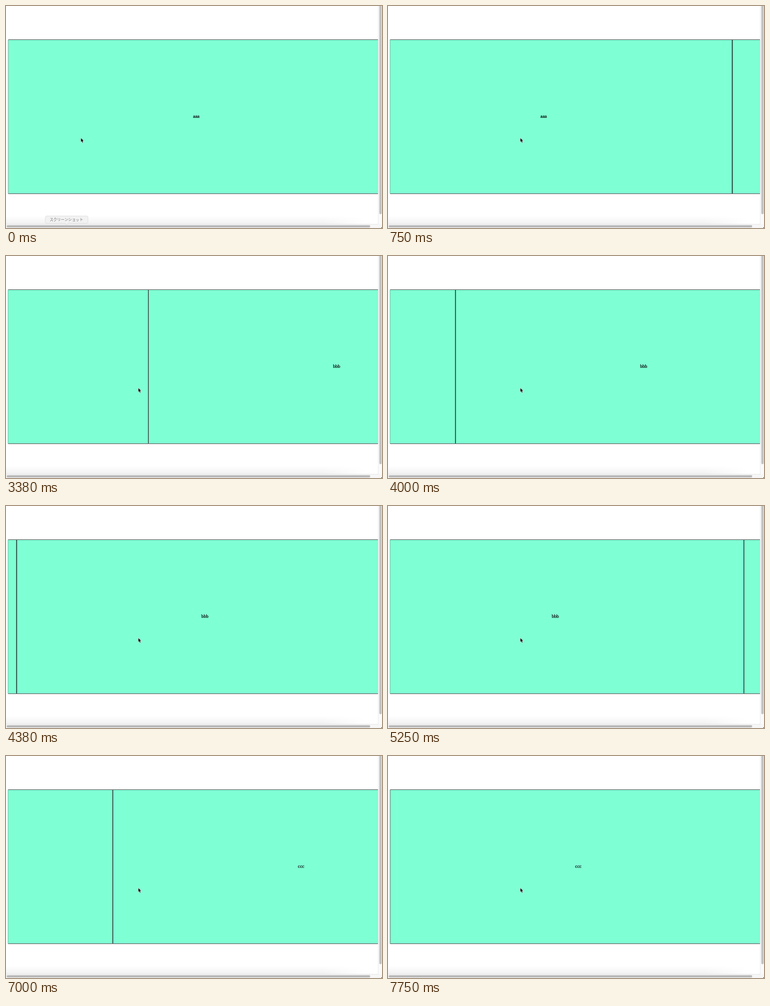
Recreate the animation shown at these times as an HTML page. Size 640 by 379 pixels, loop 8000 ms.

```html
<!DOCTYPE html>
<html lang="ja">
<head>
<meta charset="utf-8">
<title>Horizontal slides</title>
<style>
  html, body { margin: 0; width: 100%; height: 100%; overflow: hidden; background: #fff; }
  svg { display: block; width: 100vw; height: 100vh; }
  .slide text {
    font: 8px "Liberation Serif", "Times New Roman", serif;
    text-anchor: middle; stroke: #000; stroke-width: .2px;
  }
  #tip text {
    font: 500 6.4px "Noto Sans CJK JP", "Noto Sans CJK", sans-serif;
    text-anchor: middle; fill: #707070;
  }
</style>
</head>
<body>
<svg viewBox="0 0 640 379">
  <defs>
    <clipPath id="view"><rect x="3.5" y="50" width="630" height="280"/></clipPath>
    <linearGradient id="shade" x2="0" y2="1">
      <stop offset="0" stop-opacity="0"/>
      <stop offset="1" stop-opacity=".055"/>
    </linearGradient>
    <linearGradient id="fade">
      <stop offset=".84" stop-color="#fff"/>
      <stop offset=".96" stop-color="#fff" stop-opacity="0"/>
    </linearGradient>
    <mask id="fadeOut"><rect width="640" height="379" fill="url(#fade)"/></mask>
  </defs>

  <g clip-path="url(#view)"><g id="track"></g></g>

  <rect y="358" width="634" height="15" fill="url(#shade)" mask="url(#fadeOut)"/>

  <rect x="633.5" width="6.5" height="379" fill="#fafafa"/>
  <rect x="633.5" width=".6" height="373" fill="#e4e4e4"/>
  <rect y="372.6" width="640" height="6.4" fill="#f6f6f6"/>
  <rect y="372.4" width="634" height=".6" fill="#e0e0e0"/>
  <rect x="635.4" y="-3" width="4" height="358.5" rx="2" fill="#c1c1c1"/>
  <rect x="1" y="374.2" width="619" height="3.8" rx="1.9" fill="#b8b8b8"/>
  <path d="M640 377.2V379H638.2Q639.6 378.6 640 377.2Z"/>

  <g id="tip">
    <path d="M69 358.5H137.5Q139.5 358.5 139.5 360.5V369Q139.5 371 137.5 371H105.5L103.2 373.8L101 371H69Q67 371 67 369V360.5Q67 358.5 69 358.5Z"
          fill="#f2f2f2" stroke="#d6d6d6" stroke-width=".6"/>
    <text x="102.8" y="367.2">スクリーンショット</text>
  </g>

  <path id="cursor" d="M0 0V6.7L1.4 5.4L2.5 7.8L3.6 7.3L2.5 4.9H4.6Z"
        stroke="#fff" stroke-width=".9" paint-order="stroke" stroke-linejoin="round"/>
</svg>

<script>
const LOOP = 8000, TICK = 125;
const LEFT = 3.5, TOP = 57.4, WIDTH = 641.5, HEIGHT = 263.2, LINE = 0.6;

// Each swipe runs from one tick to another and ends at offset `to`;
// `enter` and `leave` are its relative speeds at both ends.
const swipes = [
  { start: 4, end: 6, to: 59, enter: 1.4, leave: 0 },
  { start: 11, end: 13, to: 281.5, enter: 1, leave: 1 },
  { start: 21, end: 23, to: 382, enter: 0, leave: 1 },
  { start: 26, end: 32, to: 530.2, enter: 0.8, leave: 1.2 },
  { start: 32, end: 37, to: WIDTH, enter: 2.3, leave: 0 },
  { start: 41, end: 44, to: 698.5, enter: 2.9, leave: 0 },
  { start: 46, end: 50, to: 1086, enter: 1.3, leave: 0.4 },
  { start: 55, end: 62, to: 2 * WIDTH, enter: 0.38, leave: 0 }
];

const $ = id => document.getElementById(id);
const track = $("track"), cursor = $("cursor"), tip = $("tip");

function add(parent, name, attrs, text = "") {
  const el = document.createElementNS("http://www.w3.org/2000/svg", name);
  for (const key in attrs) el.setAttribute(key, attrs[key]);
  el.textContent = text;
  return parent.appendChild(el);
}

["aaa", "bbb", "ccc"].forEach((label, i) => {
  const x = LEFT + i * WIDTH;
  const slide = add(track, "g", { class: "slide" });
  add(slide, "rect", { x, y: TOP, width: WIDTH, height: HEIGHT });
  add(slide, "rect", {
    x: x + LINE, y: TOP + LINE, width: WIDTH - 2 * LINE, height: HEIGHT - 2 * LINE, fill: "#7fffd4"
  });
  add(slide, "text", { x: x + WIDTH / 2 - 0.3, y: 191.3 }, label);
});

const progress = (tick, start, end) => Math.min(1, Math.max(0, (tick - start) / (end - start)));

// Cubic from 0 to 1 with the given slopes at its ends.
const ease = (p, enter, leave) =>
  p * p * (3 - 2 * p) + enter * p * (1 - p) ** 2 - leave * p * p * (1 - p);

function offsetAt(tick) {
  let offset = 0;
  for (const { start, end, to, enter, leave } of swipes) {
    offset += (to - offset) * ease(progress(tick, start, end), enter, leave);
    if (tick < end) break;
  }
  return offset;
}

function draw(now) {
  const tick = Math.floor(now % LOOP / TICK);
  const moved = progress(tick, 0, 2);
  track.setAttribute("transform", `translate(${-offsetAt(tick)} 0)`);
  cursor.setAttribute("transform", `translate(${127.6 + 97.8 * moved} 225.4)`);
  tip.setAttribute("opacity", 1 - moved);
}

let origin;
function frame(now) {
  origin ??= now;
  draw(now - origin);
  requestAnimationFrame(frame);
}
draw(0);
requestAnimationFrame(frame);
</script>
</body>
</html>
```
